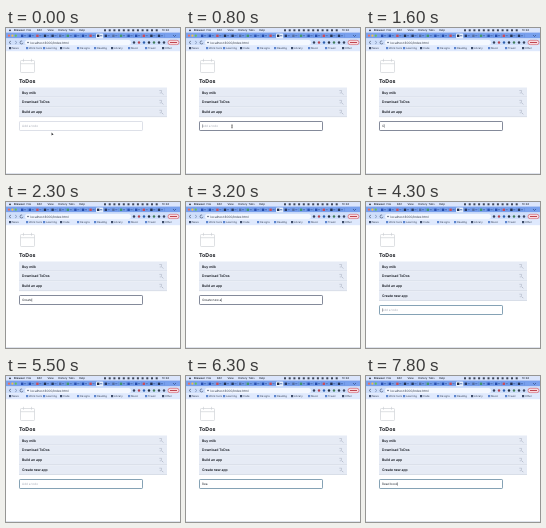
Recreate the animation shown at these times as an HTML page with a canvas. Size 174 px wide and 146 px high, loop 8000 ms.

```html
<!DOCTYPE html>
<html lang="en">
<head>
<meta charset="utf-8">
<title>ToDos</title>
<style>
html, body { margin: 0; width: 100%; height: 100%; overflow: hidden; background: #fff; }
canvas { display: block; width: 174px; height: 146px; }
</style>
</head>
<body>
<canvas id="stage"></canvas>
<script>
const W = 174, H = 146, LOOP = 8000, ADDED = 4300;
const canvas = document.getElementById('stage');
const dpr = window.devicePixelRatio || 1;
canvas.width = W * dpr;
canvas.height = H * dpr;
const ctx = canvas.getContext('2d');
const SANS = 'Inter, Arial, sans-serif';

const todos = ['Buy milk', 'Download ToDos', 'Build an app'];
const first = {
  text: 'Create new app',
  keys: [1500, 1700, 1900, 2000, 2200, 2300, 3000, 3000, 3100, 3100, 3200, 3200, 4000, 4100]
};
const second = {
  text: 'Read book',
  keys: [5900, 6000, 6100, 6600, 7000, 7300, 7500, 7700, 7800]
};
// Intervals in which the text caret is shown.
const caretOn = [[800, 1300], [1500, 2600], [3000, 3700], [4000, 4500], [5000, 5500],
  [5900, 6300], [6600, 7100], [7300, 8000]];

function box(x, y, w, h, color) {
  ctx.fillStyle = color;
  ctx.fillRect(x, y, w, h);
}

function round(x, y, w, h, r, fill, stroke, line = 0.6) {
  ctx.beginPath();
  ctx.roundRect(x, y, w, h, r);
  if (fill) { ctx.fillStyle = fill; ctx.fill(); }
  if (stroke) { ctx.strokeStyle = stroke; ctx.lineWidth = line; ctx.stroke(); }
}

function dot(x, y, r, color) {
  ctx.beginPath();
  ctx.arc(x, y, r, 0, Math.PI * 2);
  ctx.fillStyle = color;
  ctx.fill();
}

function path(points, color, line = 0.6) {
  ctx.beginPath();
  points.forEach(([x, y], i) => i ? ctx.lineTo(x, y) : ctx.moveTo(x, y));
  ctx.strokeStyle = color;
  ctx.lineWidth = line;
  ctx.stroke();
}

function label(text, x, y, size, color, weight = 400) {
  ctx.font = `${weight} ${size}px ${SANS}`;
  ctx.textRendering = 'geometricPrecision';
  ctx.fillStyle = color;
  ctx.fillText(text, x, y);
}

function drawBrowser() {
  // System menu bar
  box(0, 0, W, 4.5, '#dbe5fb');
  dot(4, 2.3, 0.9, '#222936');
  ['Browser', 'File', 'Edit', 'View', 'History', 'Tabs', 'Help'].forEach((name, i) =>
    label(name, 8 + i * 10.5 + (i ? 2 : 0), 3.3, 2.7, '#252c39', i ? 500 : 700));
  for (let i = 0; i < 12; i++) box(98 + i * 4.7, 1.3, 2, 2, '#3c4558');
  label('10:24', 156, 3.3, 2.7, '#252c39', 500);

  // Tabs
  box(0, 4.5, W, 6, '#78a0ed');
  ['#ed6a5e', '#f4bf4f', '#61c554'].forEach((c, i) => dot(3 + i * 3.4, 7.7, 1.1, c));
  const colors = ['#294fae', '#c94c58', '#26385f', '#42966b', '#244caa', '#222e4b', '#536ca0'];
  for (let i = 0; i < 19; i++) {
    const x = 15 + i * 7.6;
    if (i === 10) round(x - 1, 5.5, 7.4, 5, 1, '#e6effd');
    box(x, 6.6, 2.4, 2.4, colors[i * 4 % colors.length]);
    box(x + 3, 7.4, 2.2, 0.8, '#3d5f9f');
    box(x + 6.2, 6.2, 0.4, 3, '#587fc6');
  }
  path([[167, 7], [168.5, 8.5], [170, 7]], '#233b70');

  // Address bar
  box(0, 10.5, W, 7, '#cfdffb');
  path([[5, 13], [3, 14.5], [5, 16]], '#394966');
  path([[9, 13], [11, 14.5], [9, 16]], '#7186ad');
  ctx.beginPath();
  ctx.arc(15.5, 14.5, 1.5, 0.2, 5.2);
  ctx.strokeStyle = '#394966';
  ctx.stroke();
  round(19, 12, 106, 5, 2.5, '#f4f8ff');
  dot(22, 14.5, 0.8, '#4b566c');
  label('localhost:3000/index.html', 24.5, 15.6, 3.1, '#2d3646');
  ['#34425d', '#b74150', '#2d5fae', '#272f40', '#3e7d59', '#303b51', '#394560']
    .forEach((c, i) => dot(128 + i * 5, 14.5, 1.2, c));
  round(162, 12.3, 11, 4.4, 2.2, '#f7dce2', '#d34e58');
  box(164, 14, 7, 0.9, '#b93440');

  // Bookmarks
  box(0, 17.5, W, 5.7, '#dfe9fd');
  ['News', 'Work tools', 'Learning', 'Code', 'Designs', 'Reading', 'Library', 'Music', 'Travel', 'Other']
    .forEach((name, i) => {
      const x = 3 + i * 17;
      box(x, 19, 2.2, 2.2, i % 3 ? '#5c85cf' : '#3d4c69');
      label(name, x + 3, 21.2, 2.6, '#344159');
    });
}

function drawHeader() {
  const gray = '#c8cbd1';
  round(14.5, 32.5, 14, 12, 0.8, '#fff', gray);
  path([[14.5, 35.7], [28.5, 35.7]], gray);
  path([[17.5, 30.8], [17.5, 33.7]], gray);
  path([[25.5, 30.8], [25.5, 33.7]], gray);
  label('ToDos', 13, 55.2, 5.3, '#171a20', 700);
}

function drawRow(text, i) {
  const y = 59.5 + i * 9.9;
  box(13, y, 148, 9.5, '#e6ebf5');
  box(13, y + 9.2, 148, 0.6, '#cbd2de');
  label(text, 16, y + 6, 3.4, '#11151d', 600);
  // Small delete button
  const gray = '#a5adbd';
  path([[153.3, y + 3], [155.6, y + 3], [155.3, y + 5.5], [153.7, y + 5.5]], gray, 0.5);
  path([[156, y + 5.7], [157.3, y + 7]], gray, 0.7);
}

function drawField(t) {
  const added = t >= ADDED;
  const y = added ? 103.5 : 93.5;
  const entry = added ? second : first;
  const typed = entry.text.slice(0, entry.keys.filter(k => k <= t).length);
  const border = t < 800 ? '#cfd3df' : added ? '#668ba3' : '#656c80';
  round(13.5, y, 123, 9, 0.7, '#fff', border, t < 800 ? 0.7 : 0.8);
  label(typed || 'Add a todo', 16, y + 5.8, 3.1, typed ? '#252a33' : '#a9adb8');
  if (caretOn.some(([from, to]) => t >= from && t < to)) {
    const x = 16 + (typed ? ctx.measureText(typed).width : 0);
    box(x, y + 2.8, 0.4, 3.5, '#4b505a');
  }
}

function drawPointer(t) {
  if (t >= 1500) return;
  const p = Math.min(1, Math.max(0, (t - 200) / 400));
  const y = 104.5 - 7.6 * p * (2 - p);
  if (y < 102) {
    path([[46, y], [46, y + 3]], '#333', 0.7);
    path([[45.2, y], [46.8, y]], '#333', 0.4);
    path([[45.2, y + 3], [46.8, y + 3]], '#333', 0.4);
    return;
  }
  ctx.beginPath();
  ctx.moveTo(45.6, y);
  ctx.lineTo(45.6, y + 3);
  ctx.lineTo(46.4, y + 2.3);
  ctx.lineTo(47.6, y + 2.2);
  ctx.closePath();
  ctx.fillStyle = '#17191d';
  ctx.fill();
}

function draw(time) {
  const t = Math.floor((time % LOOP) / 100) * 100;
  ctx.setTransform(dpr, 0, 0, dpr, 0, 0);
  box(0, 0, W, H, '#fff');
  box(0, H - 1, W, 1, '#dfe3ec');
  drawBrowser();
  drawHeader();
  todos.concat(t >= ADDED ? first.text : []).forEach(drawRow);
  drawField(t);
  drawPointer(t);
}

const start = performance.now();
function frame() {
  draw(performance.now() - start);
  requestAnimationFrame(frame);
}
frame();
</script>
</body>
</html>
```
